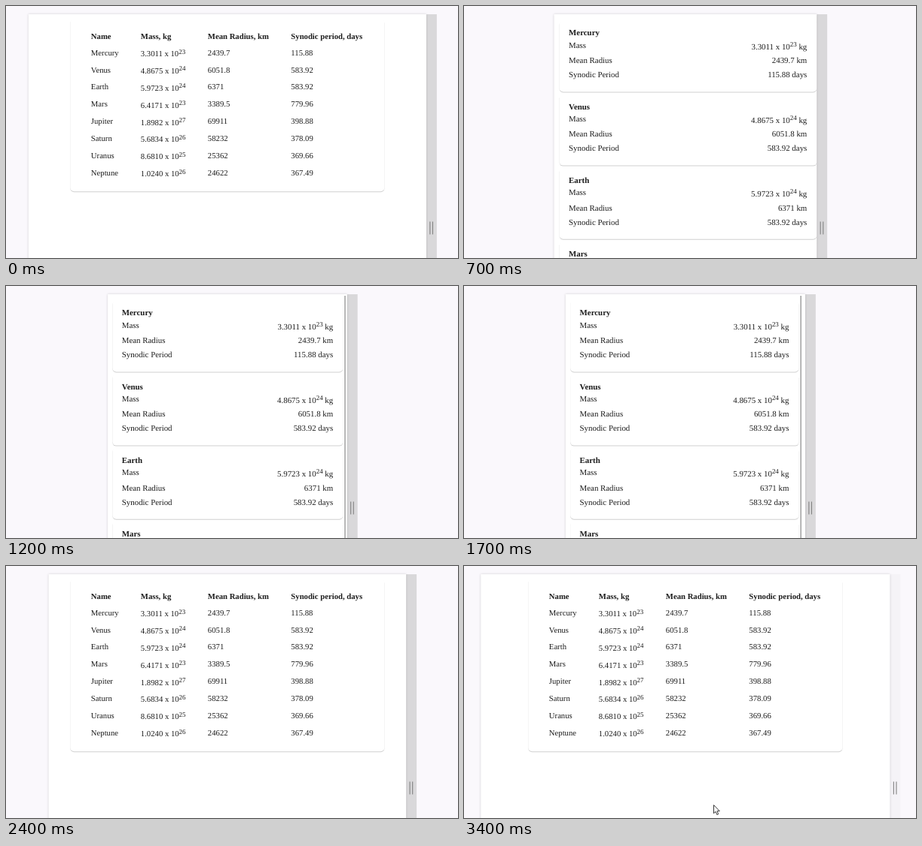
These frames come from a looping animation (600 px wide and 336 px high, 3.5 s). An HTML page:

```html
<!DOCTYPE html>
<html lang="en">
<head>
<meta charset="utf-8">
<title>Responsive planet table</title>
<style>
  html, body { margin: 0; width: 100%; height: 100%; overflow: hidden; background: #faf8fc; }
  #stage { display: block; width: 600px; height: 336px; }
  #page { overflow: hidden; }
  text { font: 10.7px "Liberation Serif", "Times New Roman", serif; fill: #1c1c1c; text-rendering: geometricPrecision; }
  #cards text { font-size: 10.88px; }
  .bold { font-weight: bold; }
  .end { text-anchor: end; }
  .sup { font-size: 8.95px; }
  .panel { fill: #fff; filter: drop-shadow(0 0 1.5px rgba(0, 0, 0, .17)); }
  .card { fill: #fff; filter: drop-shadow(0 1px .5px rgba(0, 0, 0, .19)); }
</style>
</head>
<body>
<svg id="stage" width="600" height="336" viewBox="0 0 600 336">
  <g id="handle">
    <rect id="grip" y="11" width="14" height="340"/>
    <path d="M5 287.5V304.5M8.6 287.5V304.5" stroke="#808080" stroke-width="1.1"/>
  </g>
  <rect id="panel" class="panel" y="11" height="340"/>
  <svg id="page" y="11" height="325">
    <g transform="translate(0 -11)">
      <g id="table"></g>
      <g id="cards"></g>
      <rect id="bar" y="13" width="1.4" height="330" fill="#999"/>
    </g>
  </svg>
  <path id="cursor" d="M331.5 318.7V329.8L334 327.5L335.8 331.6L337.7 330.8L335.9 326.8H339.3Z"
        fill="#fff" stroke="#222" stroke-width=".9"/>
</svg>
<script>
const LOOP = 3500, STEP = 100, LAG = 70;
const CENTER = 293.85, BREAKPOINT = 400, MAX_CARD = 417;

const heads = ["Name", "Mass, kg", "Mean Radius, km", "Synodic period, days"];
const columns = [27.5, 93.5, 182.5, 293];
const planets = `
  Mercury 3.3011 23 2439.7 115.88
  Venus 4.8675 24 6051.8 583.92
  Earth 5.9723 24 6371 583.92
  Mars 6.4171 23 3389.5 779.96
  Jupiter 1.8982 27 69911 398.88
  Saturn 5.6834 26 58232 378.09
  Uranus 8.6810 25 25362 369.66
  Neptune 1.0240 26 24622 367.49`.trim().split("\n").map(line => line.trim().split(" "));

// time, half the panel width: dragged in, held, dragged out
const drag = [
  [0, 264], [600, 179.5], [700, 174.3], [1100, 159.5], [1400, 157.5],
  [1600, 157.5], [1700, 159], [2100, 207], [2300, 231], [2800, 262.2], [3100, 271.5], [LOOP, 271.5]
];

const $ = id => document.getElementById(id);

function set(el, attrs) {
  for (const name in attrs) el.setAttribute(name, attrs[name]);
}

function show(id, visible) {
  set($(id), { display: visible ? "inline" : "none" });
}

function add(parent, tag, attrs, content) {
  const el = document.createElementNS("http://www.w3.org/2000/svg", tag);
  set(el, attrs);
  if (content) el.textContent = content;
  parent.appendChild(el);
  return el;
}

function addMass(parent, y, [, mass, power], unit, cls) {
  const el = add(parent, "text", { y, class: cls }, mass + " x 10");
  add(el, "tspan", { dy: -3.6, class: "sup" }, power);
  if (unit) add(el, "tspan", { dy: 3.6 }, " " + unit);
  return el;
}

const tableCard = add($("table"), "rect", { class: "card", y: 17, height: 230.3, rx: 5 });
const cells = heads.map(h => [add($("table"), "text", { y: 44.3, class: "bold" }, h)]);
planets.forEach((p, i) => {
  const y = 65.7 + 22.87 * i;
  const text = s => add($("table"), "text", { y }, s);
  [text(p[0]), addMass($("table"), y + 1.4, p, "", ""), text(p[3]), text(p[4])]
    .forEach((el, c) => cells[c].push(el));
});

const boxes = [], labels = [], values = [];
planets.slice(0, 4).forEach((p, i) => {
  const g = add($("cards"), "g", { transform: `translate(0 ${98.2 * i})` });
  const label = (y, s, cls) => labels.push(add(g, "text", { y, class: cls }, s));
  const value = (y, s) => values.push(add(g, "text", { y, class: "end" }, s));
  boxes.push(add(g, "rect", { class: "card", y: 19, height: 95.4, rx: 5 }));
  label(39.4, p[0], "bold");
  label(56, "Mass", "");
  values.push(addMass(g, 57.5, p, "kg", "end"));
  label(76.2, "Mean Radius", "");
  value(76.2, p[3] + " km");
  label(95.3, "Synodic Period", "");
  value(95.3, p[4] + " days");
});

function panelWidth(t) {
  const i = drag.findIndex(([time]) => time > t);
  const [t0, a] = drag[i - 1], [t1, b] = drag[i];
  return 2 * (a + (b - a) * (t - t0) / (t1 - t0));
}

function draw(t) {
  const panel = panelWidth(t);
  const left = CENTER - panel / 2;
  const layout = panelWidth(Math.max(0, t - LAG)); // the page reflows a little late
  const wide = layout >= BREAKPOINT;
  const width = Math.min(MAX_CARD, layout * .96);
  const x = ((wide ? panel : layout) - width) / 2;
  const released = t >= 3400;

  set($("panel"), { x: left, width: panel });
  set($("page"), { x: left, width: panel });
  set($("handle"), { transform: `translate(${left + panel} 0)` });
  set($("grip"), { fill: released ? "#f5f3f7" : "#d9d8da" });
  set($("bar"), { x: layout - 4.3 });
  show("cursor", released);
  show("table", wide);
  show("cards", !wide);
  show("bar", t >= 1100 && t < 1900);

  if (wide) {
    set(tableCard, { x, width });
    cells.forEach((col, c) => col.forEach(el => set(el, { x: x + columns[c] * width / MAX_CARD })));
  } else {
    boxes.forEach(el => set(el, { x, width }));
    labels.forEach(el => set(el, { x: x + 12.4 }));
    values.forEach(el => set(el, { x: x + width - 13 }));
  }
}

const start = performance.now();
function tick() {
  const t = (performance.now() - start) % LOOP;
  draw(Math.floor(t / STEP) * STEP);
  requestAnimationFrame(tick);
}
tick();
</script>
</body>
</html>
```
